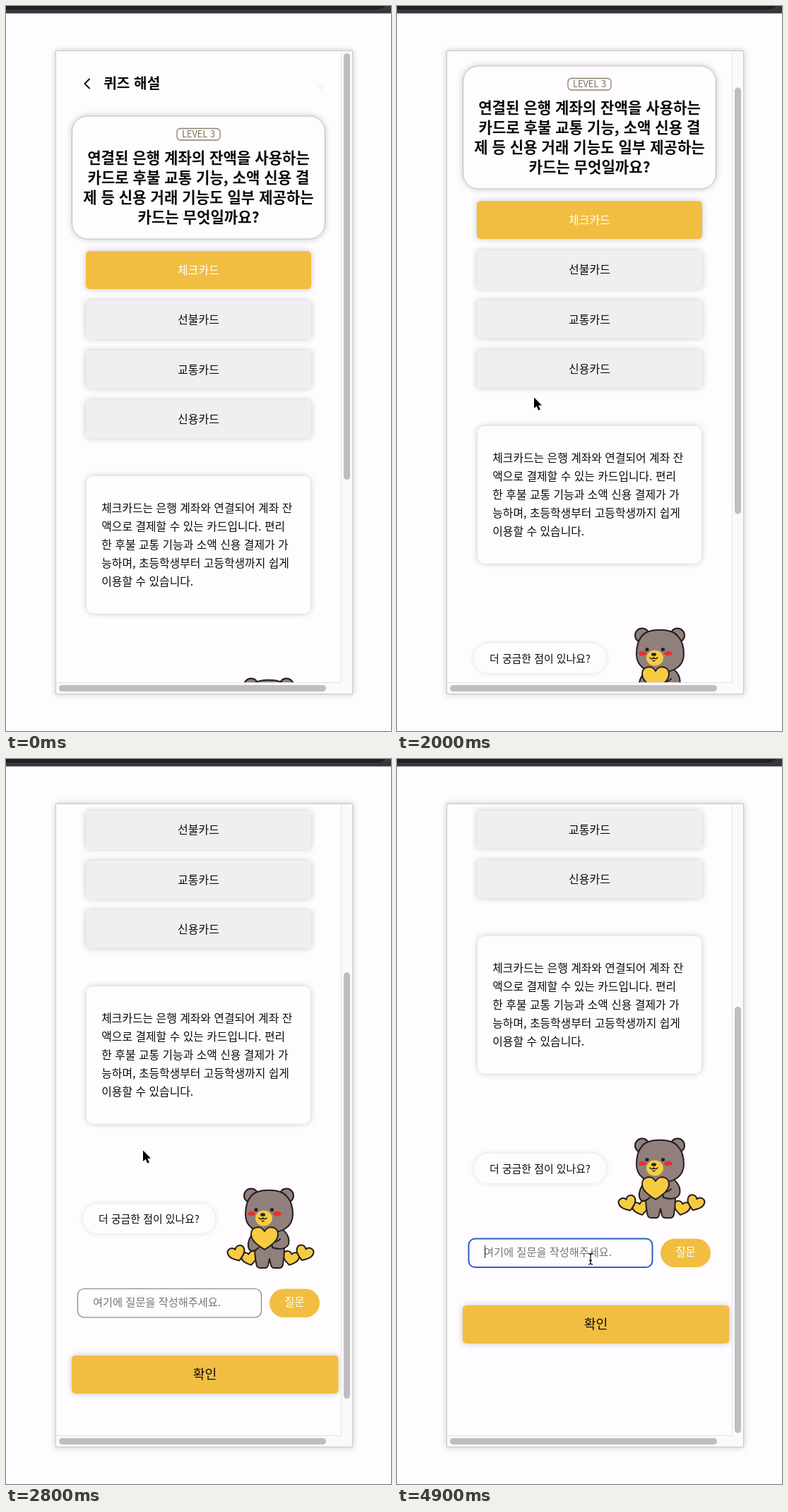
An HTML page that plays this animation: 545x1027 px, repeating every 5000 ms.

```html
<!DOCTYPE html>
<html lang="ko">
<head>
<meta charset="utf-8">
<title>퀴즈 해설</title>
<style>
  html, body { margin: 0; width: 100%; height: 100%; overflow: hidden; background: #fefcff; }
  svg { display: block; width: 100%; height: 100%; }
  text { font-family: "Noto Sans CJK KR", "Noto Sans KR", "Noto Sans CJK", sans-serif; white-space: pre; }
  .ink { stroke: #231f20; stroke-width: 2; stroke-linejoin: round; stroke-linecap: round; }
  .ink use, .ink path { vector-effect: non-scaling-stroke; }
  .thin { stroke-width: 1.5; }
  .fur { fill: #917f7c; }
  .gold { fill: #f7cb41; }
</style>
</head>
<body>
<svg viewBox="0 0 545 1027">
  <defs>
    <filter id="soft" x="-10%" y="-40%" width="120%" height="180%">
      <feDropShadow dx="0" dy="0" stdDeviation="4" flood-color="#000" flood-opacity=".22"/>
    </filter>
    <filter id="faint" x="-10%" y="-30%" width="120%" height="160%">
      <feDropShadow dx="0" dy="0" stdDeviation="3.500" flood-color="#000" flood-opacity=".13"/>
    </filter>
    <clipPath id="view"><rect x="71" y="64" width="403" height="894"/></clipPath>
    <path id="heart" d="M0 15C-9 9 -19 3 -19 -7C-19 -18 -5 -20 0 -11C5 -20 19 -18 19 -7C19 3 9 9 0 15Z" vector-effect="non-scaling-stroke"/>
  </defs>

  <rect width="545" height="1027" fill="#fefcff"/>
  <rect width="545" height="10.5" fill="#38373c"/>
  <path d="M0 0H537Q533 5 524 5H0Z" fill="#211f25"/>

  <g id="panel">
    <rect x="70.5" y="63.5" width="420" height="911" fill="#fefcff" stroke="#c9c8ca" filter="url(#soft)"/>
    <path d="M474 64H490V974H71V958H474Z" fill="#faf9fb"/>
    <path d="M474.5 64V958.5H71" fill="none" stroke="#e4e3e5"/>
    <rect x="75" y="962" width="378" height="9" rx="4.5" fill="#bfbdc0"/>
    <rect id="thumb" x="478" y="67" width="9" height="604" rx="4.5" fill="#bfbdc0"/>

    <g clip-path="url(#view)">
      <g id="page">
        <path d="M118 103.500L111.500 110L118 116.500" fill="none" stroke="#111" stroke-width="2" stroke-linecap="round" stroke-linejoin="round"/>
        <g id="boxes"></g>
        <g id="labels"></g>

        <g transform="translate(0 415)">
          <g class="ink gold">
            <use href="#heart" transform="translate(345 637) rotate(-12) scale(.6)"/>
            <use href="#heart" transform="translate(327 630.500) rotate(-20) scale(.64)"/>
            <use href="#heart" transform="translate(403 637) rotate(12) scale(.6)"/>
            <use href="#heart" transform="translate(422 630) rotate(20) scale(.64)"/>
          </g>
          <g class="ink fur">
            <path d="M353 596C351 615 352 636 355 647Q356 650 361 650H367Q370 650 371 646L373 637L375 646Q376 650 380 650H387Q391 650 392 645C395 630 394 612 391 596Z"/>
            <path d="M389 594C398 599 402 609 400 616C397 624 385 624 377 621L376 614Q385 613 388 609"/>
            <path d="M351 600C344 606 341 617 344 623C347 629 354 625 358 621"/>
            <circle cx="347" cy="547.500" r="10"/>
            <circle cx="397" cy="547.500" r="10"/>
            <path d="M347 548C356 537 388 537 397 548C404 555 406 565 406 574C406 592 391 600 372 600C352 600 339 591 339 574C339 564 341 555 347 548Z"/>
          </g>
          <g fill="#e0352f">
            <ellipse cx="347.500" cy="573" rx="5.500" ry="3.200"/>
            <ellipse cx="384" cy="573" rx="6" ry="3.200"/>
          </g>
          <ellipse class="gold" cx="365" cy="579.500" rx="12" ry="11"/>
          <g fill="#231f20">
            <circle cx="354" cy="567.500" r="2.600"/>
            <circle cx="376.500" cy="567.500" r="2.600"/>
            <ellipse cx="363.500" cy="574.500" rx="3.500" ry="2.300"/>
          </g>
          <path class="ink thin" d="M358 579Q361 582.500 363.500 579Q366 582.500 369 579M362 583.500H365" fill="none"/>
          <use href="#heart" class="ink gold" transform="translate(366 609)"/>
        </g>
        <path id="caret" d="M124.500 1104V1122" stroke="#222"/>
      </g>
    </g>
  </g>

  <path id="arrow" d="M0 0V15.500L3.600 12.200L6.200 18.200L8.900 17L6.300 11.200H11Z" fill="#000" stroke="#fff" stroke-width="1.600" paint-order="stroke"/>
  <path id="beam" d="M-3 -7.500Q0 -7.500 0 -5Q0 -7.500 3 -7.500M0 -5V5.500M-3 8Q0 8 0 5.500Q0 8 3 8M-2 2.500H2" fill="none" stroke="#111" stroke-width="1.300"/>
</svg>

<script>
const LOOP = 5000, STEP = 100;
const WHITE = '#fefcff', GOLD = '#f1be42', GRAY = '#efeef0', INK = '#0b0b0c';
const el = id => document.getElementById(id);

function add(parent, tag, attrs, content = '') {
  const node = document.createElementNS('http://www.w3.org/2000/svg', tag);
  for (const key in attrs) node.setAttribute(key, attrs[key]);
  node.textContent = content;
  parent.append(node);
  return node;
}

function box(x, y, width, height, rx, fill, more = {}) {
  return add(el('boxes'), 'rect', { x, y, width, height, rx, fill, filter: 'url(#soft)', ...more });
}

// y is the middle of the Hangul glyphs
function label(content, x, y, size, more = {}) {
  return add(el('labels'), 'text', { x, y: y + size * 0.37, 'font-size': size, fill: INK, ...more }, content);
}

const centered = { 'text-anchor': 'middle' };
const bold = { 'font-weight': 600 };
const flat = { filter: 'none' };

label('퀴즈 해설', 138.3, 109.5, 20.2, bold);
label('로', 440, 116, 12, { fill: '#f0eff2' });

box(93.5, 156, 358, 174, 22, WHITE, { stroke: '#bab9bc' });
box(242, 173.5, 61, 16.5, 5, 'none', { stroke: '#8b8068', 'stroke-width': 1.3, ...flat });
label('LEVEL 3', 272.5, 181.7, 12.8, { ...centered, 'font-weight': 300, fill: '#776f60' });
['연결된 은행 계좌의 잔액을 사용하는', '카드로 후불 교통 기능, 소액 신용 결',
 '제 등 신용 거래 기능도 일부 제공하는', '카드는 무엇일까요?']
  .forEach((line, i) => label(line, 272.5, 215 + 28.1 * i, 21.1, { ...centered, ...bold }));

['체크카드', '선불카드', '교통카드', '신용카드'].forEach((name, i) => {
  const y = 347.3 + 70.3 * i;
  box(113, y, 319, 53.7, 5, i ? GRAY : GOLD);
  label(name, 272.5, y + 26.7, 16, { ...centered, fill: i ? INK : '#fff' });
});

box(114, 666, 317, 194.5, 10, WHITE);
['체크카드는 은행 계좌와 연결되어 계좌 잔', '액으로 결제할 수 있는 카드입니다. 편리',
 '한 후불 교통 기능과 소액 신용 결제가 가', '능하며, 초등학생부터 고등학생까지 쉽게',
 '이용할 수 있습니다.']
  .forEach((line, i) => label(line, 135.3, 711.5 + 26 * i, 15.85));

box(109, 974, 187, 42, 21, WHITE, { filter: 'url(#faint)' });
label('더 궁금한 점이 있나요?', 202.5, 995, 14.9, centered);
const field = box(101.5, 1094.5, 260, 40.5, 9, WHITE, flat);
label('여기에 질문을 작성해주세요.', 123, 1113.5, 15.25, { fill: '#77767a' });
box(373, 1094.5, 71, 40.5, 20.2, GOLD, flat);
label('질문', 408.5, 1113.5, 15.4, { ...centered, fill: '#fff' });
box(93, 1189, 377.5, 54, 5, GOLD);
label('확인', 281.5, 1215, 18.3, centered);

// Piecewise linear value through [time, value] points
function track(points, t) {
  const i = points.findIndex(p => p[0] > t);
  if (i === 0) return points[0][1];
  if (i < 0) return points[points.length - 1][1];
  const [t0, v0] = points[i - 1], [t1, v1] = points[i];
  return v0 + (v1 - v0) * (t - t0) / (t1 - t0);
}

const scrollPoints = [[1600, 0], [1800, 22], [2000, 71], [2200, 107], [2400, 148],
                      [2600, 240], [2800, 344], [2900, 378], [3000, 400], [3100, 411], [3200, 415]];
const bouncePoints = [[1000, 0], [1100, -5], [1300, -3], [1600, 0], [3100, 0], [3300, -2], [3400, -2], [3700, 0]];
const cursorX = [[400, 6], [500, 11], [1100, 11], [1300, 90], [1500, 180], [1600, 194], [3800, 194], [4200, 236], [4600, 274]];
const cursorY = [[1100, 582.5], [1300, 572], [1600, 554.5], [3800, 554.5], [4200, 640], [4600, 708]];

function render(time) {
  const t = Math.floor(time % LOOP / STEP) * STEP;
  const scroll = track(scrollPoints, t);
  const x = track(cursorX, t), y = track(cursorY, t);
  const overField = t > 3800 && y > 680, focused = t >= 4800;

  el('panel').setAttribute('transform', `translate(0 ${track(bouncePoints, t)})`);
  el('page').setAttribute('transform', `translate(0 ${-scroll})`);
  el('thumb').setAttribute('y', 67 + scroll * 0.684);
  for (const id of ['arrow', 'beam']) el(id).setAttribute('transform', `translate(${x} ${y})`);
  el('arrow').style.display = t >= 400 && !overField ? '' : 'none';
  el('beam').style.display = overField ? '' : 'none';
  el('caret').style.display = focused ? '' : 'none';
  field.setAttribute('stroke', focused ? '#2a60c0' : '#79787c');
  field.setAttribute('stroke-width', focused ? 2 : 1.1);
}

const start = performance.now();
function tick() {
  render(performance.now() - start);
  requestAnimationFrame(tick);
}
tick();
</script>
</body>
</html>
```
